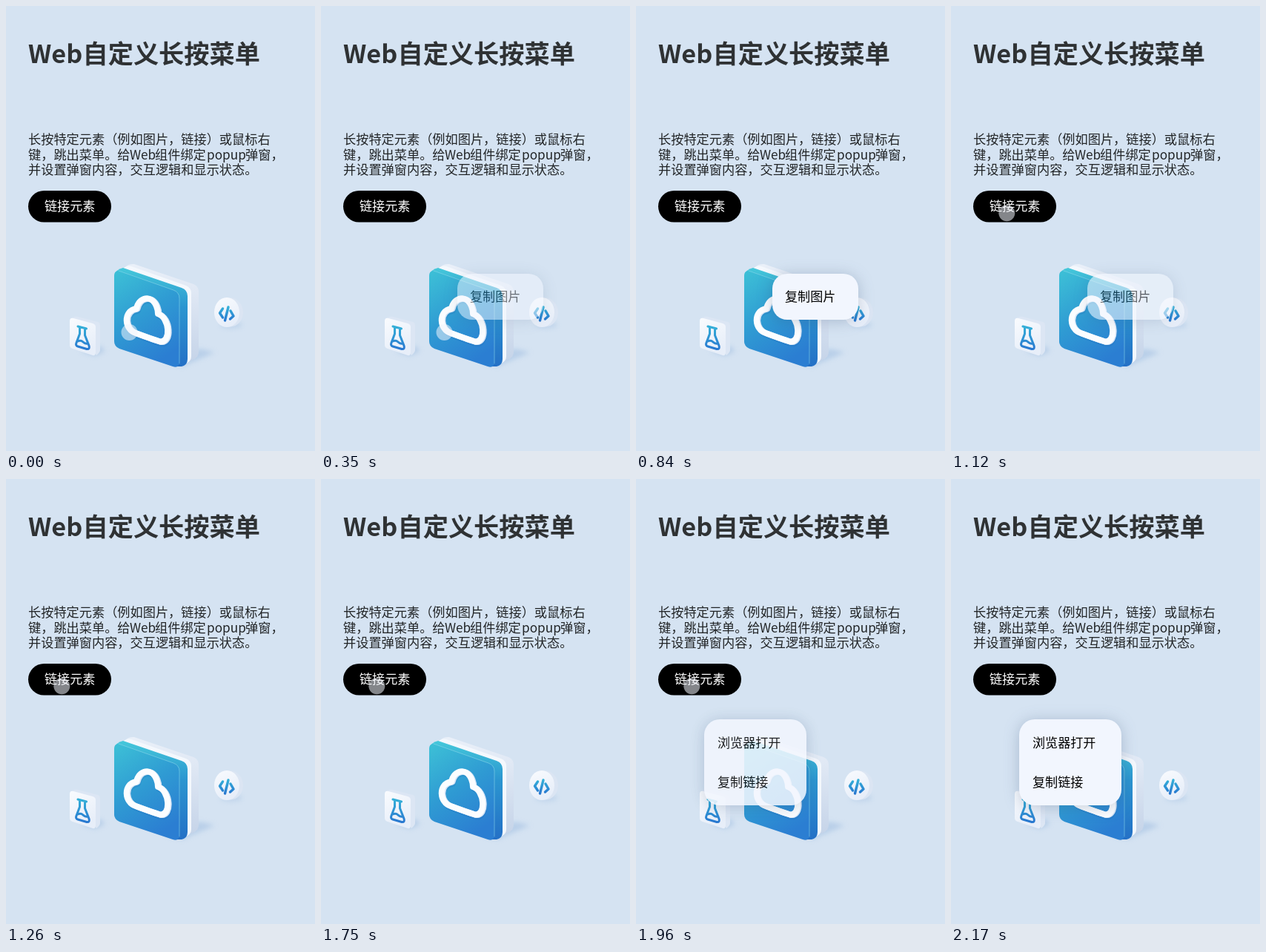
An HTML page that plays this animation: 417x600 px, repeating every 3.7 s.

```html
<!DOCTYPE html>
<html lang="zh-CN">
<head>
<meta charset="utf-8">
<title>Web自定义长按菜单</title>
<style>
  html, body { margin: 0; height: 100%; overflow: hidden; background: #d5e3f2; }
  svg { display: block; width: 417px; height: 600px; font: 17.1px "Noto Sans CJK SC", "Noto Sans CJK", sans-serif; }
  .card { fill: #f2f6fe; filter: drop-shadow(0 2px 10px rgba(50, 75, 115, .28)); }
  .line { fill: none; stroke-linecap: round; stroke-linejoin: round; }
</style>
</head>
<body>
<svg viewBox="0 0 417 600">
  <defs>
    <linearGradient id="face" x1=".1" y1="0" x2=".55" y2="1">
      <stop offset="0" stop-color="#3cbed6"/><stop offset=".5" stop-color="#2f9bd3"/><stop offset="1" stop-color="#2b7ed2"/>
    </linearGradient>
    <linearGradient id="edge" x2="0" y2="1">
      <stop offset="0" stop-color="#45c8da"/><stop offset=".4" stop-color="#2b95d0"/><stop offset="1" stop-color="#2470c6"/>
    </linearGradient>
    <linearGradient id="slab" x2="0" y2="1">
      <stop offset="0" stop-color="#eaf0f9"/><stop offset="1" stop-color="#c4d3e8"/>
    </linearGradient>
    <linearGradient id="tile" x2=".4" y2="1">
      <stop offset="0" stop-color="#f9fbfe"/><stop offset="1" stop-color="#e7eef9"/>
    </linearGradient>
    <linearGradient id="ink" x2="0" y2="1">
      <stop offset="0" stop-color="#35b0d8"/><stop offset="1" stop-color="#2878d0"/>
    </linearGradient>
    <filter id="soft" x="-30%" y="-60%" width="160%" height="220%"><feGaussianBlur stdDeviation="3"/></filter>
    <path id="cloud" d="M175 441C160 437 157 411 176 408C179 393 196 388 203 405Q205 410 205 415C221 420 223 454 208 452.500Q202 451 175 441Z"/>
  </defs>
  <rect width="417" height="600" fill="#d5e3f2"/>

  <text y="77" font-size="34.2" font-weight="700" fill="#2f3234"><tspan x="30">Web</tspan><tspan x="103.5">自定义长按菜单</tspan></text>
  <g font-size="17.2" fill="#222527">
    <text x="30" y="186">长按特定元素（例如图片，链接）或鼠标右</text>
    <text y="206.5"><tspan x="30">键，跳出菜单。给</tspan><tspan x="167">Web</tspan><tspan x="201">组件绑定</tspan><tspan x="271">popup</tspan><tspan x="323">弹窗，</tspan></text>
    <text x="30" y="227">并设置弹窗内容，交互逻辑和显示状态。</text>
  </g>
  <rect x="30" y="249" width="112" height="42.500" rx="21.250"/>
  <text x="52" y="276" fill="#fff">链接元素</text>

  <!-- cloud block -->
  <path d="M215 480L262 462L282 467L238 486Z" fill="#9dbce0" opacity=".5" filter="url(#soft)"/>
  <path d="M158 356Q163 347 173 348L253 375Q260 378 260 386V466Q260 473 254 476L236 484Z" fill="url(#slab)"/>
  <path d="M158 354Q163 349 169 351L243 377Q250 380 250 387V472Q250 478 245 481L230 484Z" fill="#f4f8fd"/>
  <path d="M146 364Q148 355 158 353L237 380Q245 383 245 391V476Q245 484 237 486L226 486Z" fill="url(#edge)"/>
  <path d="M146 364Q146 355 155 358L226 383Q234 386 234 394V479Q234 489 225 486L153 462Q146 459 146 452Z" fill="url(#face)"/>
  <path d="M152 357L226 383Q234 386 234 394V482" class="line" stroke="#8fd9ec" stroke-width=".8" opacity=".7"/>
  <g class="line" stroke-width="8">
    <use href="#cloud" x="2" y="3" stroke="#1f68b4" opacity=".22"/>
    <use href="#cloud" x="1.5" y=".5" stroke="#d4e4f6"/>
    <use href="#cloud" stroke="#fbfdff"/>
  </g>

  <!-- flask tile -->
  <path d="M100 466L127 458L134 465L121 472Z" fill="#9dbce0" opacity=".5" filter="url(#soft)"/>
  <path d="M89 421Q92 418 97 419L124 426Q127 427 127 431V464Q127 467 122 471Z" fill="#dce6f4"/>
  <path d="M86 425Q86 420 91 421L117 428Q121 429 121 433V467Q121 472 117 471L90 462Q86 461 86 457Z" fill="url(#tile)"/>
  <path d="M97 432L108.500 435M99.500 433V442L95 454Q93.500 458 97 459L109 462.500Q113.500 463 112 458L106.500 444V435M97 452Q101 450 104 453T110 455" class="line" stroke="url(#ink)" stroke-width="3"/>

  <!-- code badge -->
  <ellipse cx="304" cy="430" rx="15" ry="5" fill="#9dbce0" opacity=".35" filter="url(#soft)"/>
  <ellipse cx="303" cy="413" rx="17" ry="19.500" fill="#dbe5f3"/>
  <ellipse cx="298" cy="413" rx="17" ry="20" fill="url(#tile)"/>
  <path d="M292.500 408L288.500 414L292.500 420M303 411L307 418L302.500 422M300 406L295.500 424" class="line" stroke="url(#ink)" stroke-width="3.400"/>

  <g id="imageMenu">
    <rect class="card" x="184" y="361" width="116" height="62" rx="20"/>
    <text x="201" y="398">复制图片</text>
  </g>
  <g id="linkMenu">
    <rect class="card" x="92" y="324" width="138" height="116" rx="21"/>
    <text x="110" y="361.500">浏览器打开</text>
    <text x="110" y="415">复制链接</text>
  </g>
  <circle id="touch" r="11" fill="#f0f4fb" fill-opacity=".55"/>
</svg>
<script>
  const LOOP = 3700, STEP = 70;
  const [imageMenu, linkMenu, touch] = ['imageMenu', 'linkMenu', 'touch'].map(id => document.getElementById(id));

  function ease(t, start, length) {
    const k = Math.min(1, Math.max(0, (t - start) / length));
    return k * k * (3 - 2 * k);
  }

  function draw(now) {
    const t = Math.floor(now % LOOP / STEP) * STEP;
    imageMenu.setAttribute('opacity', ease(t, 230, 240) - ease(t, 1035, 190));
    linkMenu.setAttribute('opacity', ease(t, 1775, 240));
    const onImage = t < 840, onLink = t >= 1120 && t < 2170;
    touch.setAttribute('transform', onImage ? 'translate(166.5 440)' : 'translate(75.3 279.3)');
    touch.setAttribute('opacity', onImage || onLink ? 1 : 0);
  }

  let start;
  function tick(now) {
    start ??= now;
    draw(now - start);
    requestAnimationFrame(tick);
  }
  draw(0);
  requestAnimationFrame(tick);
</script>
</body>
</html>
```
